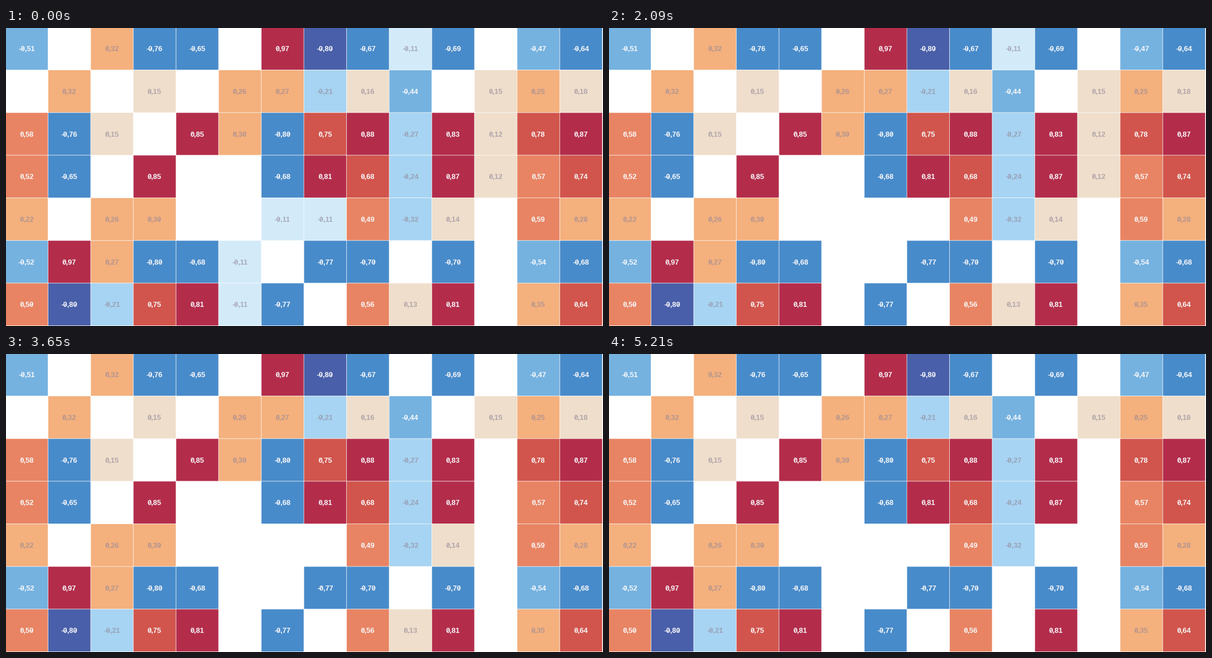
These frames come from a looping animation (1058x529 px, 5.76 s). A matplotlib script:

```python
import matplotlib.pyplot as plt
from matplotlib.animation import FuncAnimation
from matplotlib.patches import Rectangle

W, H, DPI = 1058, 529, 64
LOOP, STEP = 5760, 20
ROWS, COLS = 7, 14
PITCH_X, PITCH_Y = 75.57, 75.67
PX = 72 / DPI
FONT = 12.8

# Symmetric correlation matrix in hundredths: line i holds its pairs with j > i.
UPPER = [
    [-51, 0, 58, 52, 22, -52, 50],
    [32, -76, -65, 0, 97, -80, -67, -11, -69, 0, -47, -64],
    [15, 0, 26, 27, -21, 16, -44, 0, 15, 25, 18],
    [85, 30, -79.9, 75, 88, -27, 83, 12, 78, 87],
    [0, -68, 81, 68, -24, 87, 12, 57, 74],
    [-11, -11, 49, -32, 14, 0, 59, 28],
    [-77, -70, 0, -70, 0, -54, -68],
    [56, 13, 81, 0, 35, 64],
]
PAIRS = {(i, i + 1 + k): v for i, line in enumerate(UPPER)
         for k, v in enumerate(line) if v}

# The rising threshold drops one pair at each of these times, weakest first.
DROP_TIMES = [1540, 2090, 2490, 3110, 3650, 4580, 5210]
RANKED = sorted(PAIRS, key=lambda p: (abs(PAIRS[p]), -p[0], p[1]))
DROPS = dict(zip(RANKED, DROP_TIMES))

WARM = ["#efdecb", "#f4b07d", "#e88463", "#d1554c", "#b32d4b"]
COOL = ["#d3ebf9", "#a7d4f2", "#75b2e0", "#488bca", "#495fa9"]


def edge_x(col):
    return PITCH_X * col - 1.05


def edge_y(row):
    return PITCH_Y * row - 1.17


def cell_color(value):
    ramp = WARM if value > 0 else COOL
    return ramp[min(4, int(abs(value) // 20))]


def advance(char):
    """Width of a character in ems."""
    return {",": 0.278, "-": 0.333}.get(char, 0.556)


fig = plt.figure(figsize=(W / DPI, H / DPI), dpi=DPI, facecolor="white")
ax = fig.add_axes([0, 0, 1, 1])
ax.set_xlim(0, W)
ax.set_ylim(H, 0)
ax.axis("off")


def add_rect(x, y, w, h, **style):
    return ax.add_patch(Rectangle((x, y), w, h, linewidth=0, snap=False, **style))


def add_label(x, base, value):
    """Number with a slash through every zero."""
    label = f"{value / 100:.2f}".replace(".", ",")
    color = "#f8f8fa" if abs(value) >= 40 else (0.57, 0.53, 0.6, 0.65)
    parts = [ax.text(x, base, label, family="Liberation Sans", weight="bold",
                     size=FONT * PX, color=color, ha="center",
                     va="baseline", zorder=4)]
    left = x - FONT * sum(map(advance, label)) / 2
    for char in label:
        if char == "0":
            parts += ax.plot([left + 0.19 * FONT, left + 0.37 * FONT],
                             [base - 0.2 * FONT, base - 0.49 * FONT],
                             color=color, lw=PX, zorder=4)
        left += FONT * advance(char)
    return parts


def add_cell(row, col, value):
    box = add_rect(edge_x(col), edge_y(row), PITCH_X, PITCH_Y,
                   facecolor=cell_color(value))
    return [box] + add_label(36.5 + PITCH_X * col, 41.3 + PITCH_Y * row, value)


# Row r shows variable r + 1, column c shows variable c.
cells = {pair: [] for pair in PAIRS}
for r in range(ROWS):
    for c in range(COLS):
        pair = (min(r + 1, c), max(r + 1, c))
        if pair in PAIRS:
            cells[pair] += add_cell(r, c, PAIRS[pair])

for c in range(1, COLS + 1):
    add_rect(edge_x(c) - 0.5, 0, 1, H, facecolor="white", alpha=0.7, zorder=3)
for r in range(1, ROWS + 1):
    add_rect(0, edge_y(r) - 0.5, W, 1, facecolor="white", alpha=0.7, zorder=3)


def update(i):
    now = (i + 0.5) * STEP
    changed = []
    for pair, end in DROPS.items():
        for part in cells[pair]:
            part.set_visible(now < end)
            changed.append(part)
    return changed


anim = FuncAnimation(fig, update, frames=LOOP // STEP, interval=STEP,
                     init_func=lambda: update(0), repeat=True,
                     repeat_delay=0, blit=False)
plt.show()
```
